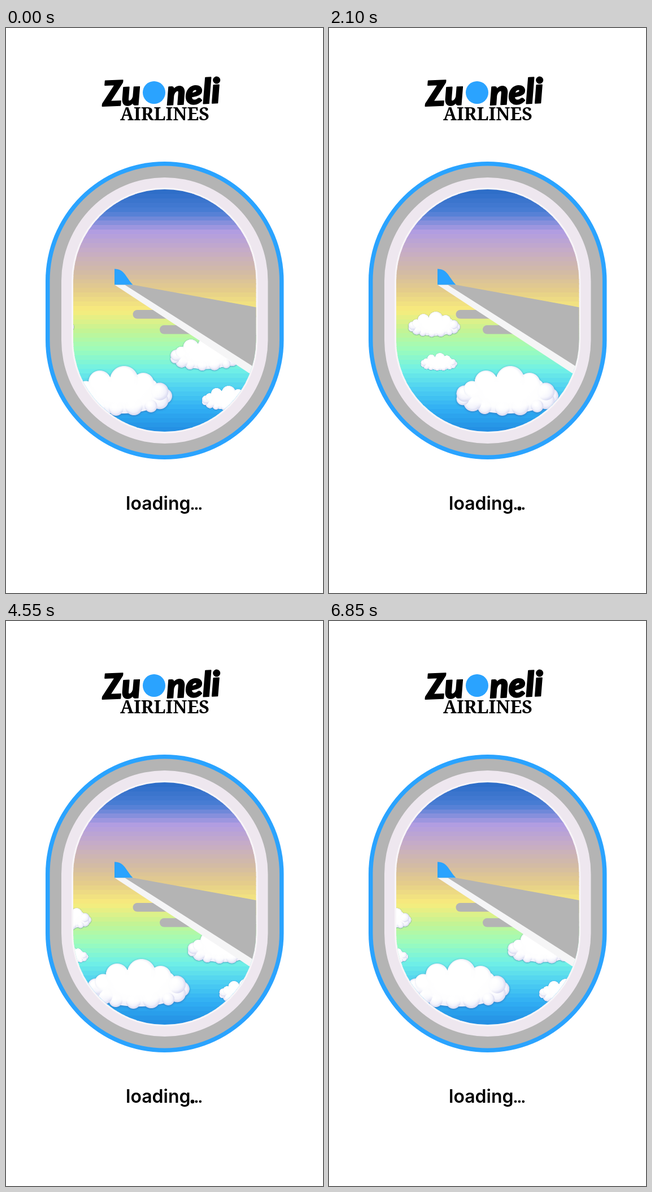
These frames come from a looping animation (561 by 998 pixels, 6.9 s). An HTML page with a canvas:

```html
<!DOCTYPE html>
<html lang="en">
<head>
<meta charset="utf-8">
<title>Loading</title>
<style>
  html, body { margin: 0; width: 100%; height: 100%; overflow: hidden; background: #fff; }
  canvas { display: block; width: 561px; height: 998px; }
</style>
</head>
<body>
<canvas id="stage" width="561" height="998"></canvas>
<script>
const ctx = document.getElementById('stage').getContext('2d');
const LOOP = 6900, STEP = 50, STEPS = LOOP / STEP, TAU = Math.PI * 2;
const BLUE = '#2aa3ff', GRAY = '#b4b4b4';

// evenly spaced from top to bottom
const SKY = ['2e6ec8', '4a7dd4', 'b09ce2', 'c6acc6', 'd2baa6', 'e4cc8a', 'f8ec7c',
  'c4f494', '9cfcbc', '70f0e6', '4ccef2', '30aef3', '2490e4'];

// three tiles of clouds make one strip; only the smallest cloud differs
const STRIP = 1174;
const TILES = [
  { start: 112, dx: -62, y: 574 },
  { start: 490, dx: 41, y: 556 },
  { start: 878, dx: -46, y: 566 }
];

function circle(c, x, y, r) {
  c.beginPath();
  c.arc(x, y, r, 0, TAU);
  c.fill();
}

// a ring of small puffs plus three large ones on top, in a 182 x 89 box
function cloudPuffs() {
  const puffs = [];
  for (let i = 0; i < 15; i++) {
    const a = i / 15 * TAU, r = 13.5 + 2.5 * Math.sin(i * 2.4);
    puffs.push([91 + (91 - r) * Math.cos(a), 53 + (35 - r) * Math.sin(a), r]);
  }
  return [...puffs, [54, 28, 20], [131, 31, 19], [97, 25, 25]];
}

function makeCloud() {
  const pad = 10, k = 2;
  const cv = document.createElement('canvas');
  cv.width = (182 + pad * 2) * k;
  cv.height = (89 + pad * 2) * k;
  const c = cv.getContext('2d');
  c.scale(k, k);
  c.translate(pad, pad);

  const puffs = cloudPuffs(), shape = new Path2D();
  for (const [x, y, r] of puffs) {
    shape.moveTo(x + r, y);
    shape.arc(x, y, r, 0, TAU);
  }
  shape.moveTo(171, 52);
  shape.ellipse(91, 52, 80, 32, 0, 0, TAU);

  c.save();
  c.shadowColor = 'rgba(50,90,165,.6)';
  c.shadowBlur = 7;
  c.shadowOffsetY = 2;
  c.fillStyle = '#f1f1fb';
  c.fill(shape);
  c.restore();

  c.clip(shape);
  for (const [x, y, r] of puffs) {
    const g = c.createRadialGradient(x - r * .25, y - r * .35, r * .3, x, y, r);
    g.addColorStop(0, '#fff');
    g.addColorStop(.65, y > 45 ? '#f3f3fc' : '#fff');
    g.addColorStop(1, y > 45 ? '#d8d9f0' : '#eaedf7');
    c.fillStyle = g;
    circle(c, x, y, r);
  }

  // soft white middle
  c.translate(90, 46);
  c.scale(1, .45);
  const mid = c.createRadialGradient(0, 0, 40, 0, 0, 78);
  mid.addColorStop(0, '#fff');
  mid.addColorStop(.6, 'rgba(255,255,255,.9)');
  mid.addColorStop(1, 'rgba(255,255,255,0)');
  c.fillStyle = mid;
  circle(c, 0, 0, 78);
  return { cv, pad, k };
}

const cloud = makeCloud();

function drawCloud(x, y, s) {
  const { cv, pad, k } = cloud;
  ctx.drawImage(cv, x - pad * s, y - pad * s, cv.width / k * s, cv.height / k * s);
}

function stadium(x, y, w, h) {
  ctx.beginPath();
  ctx.roundRect(x, y, w, h, Math.min(w, h) / 2);
}

function pane(inset) {
  stadium(70 + inset, 236 + inset, 421.5 - inset * 2, 526 - inset * 2);
}

function polygon(color, ...pts) {
  ctx.fillStyle = color;
  ctx.beginPath();
  pts.forEach(([x, y]) => ctx.lineTo(x, y));
  ctx.fill();
}

function skyColor(f) {
  const p = f * (SKY.length - 1), i = Math.min(SKY.length - 2, Math.floor(p));
  const part = (hex, j) => parseInt(hex.slice(j, j + 2), 16);
  const mix = j => Math.round(part(SKY[i], j) + (part(SKY[i + 1], j) - part(SKY[i], j)) * (p - i));
  return `rgb(${[0, 2, 4].map(mix)})`;
}

function drawSky() {
  const top = 285, bands = 54, h = 428 / bands;
  for (let i = 0; i < bands; i++) {
    ctx.fillStyle = skyColor(i / (bands - 1));
    ctx.fillRect(115, Math.round(top + i * h), 332, Math.ceil(h) + 1);
  }
}

function travel(n) {
  // steady speed with a slightly quicker stretch
  const speed = 25.29;
  const boost = Math.min(1, Math.max(0, (n - 76) / 30));
  return n * speed + boost * (3 * STRIP - STEPS * speed);
}

function drawClouds(n) {
  const shift = travel(n) % STRIP;
  for (const { start, dx, y } of TILES) {
    for (const wrap of [-STRIP, 0, STRIP]) {
      const x = start - shift + wrap;
      drawCloud(x - 84, 501, .507);
      drawCloud(x + dx, y, .357);
      drawCloud(x + 178, 544.5, .69);
      drawCloud(x + 234, 632, .495);
      drawCloud(x, 597, 1);
    }
  }
}

function drawWing() {
  ctx.fillStyle = GRAY;
  stadium(224.5, 498, 120, 15.5);
  ctx.fill();
  stadium(272, 525, 120, 15.5);
  ctx.fill();
  polygon('#f5f5f6', [192, 453.5], [224, 453.5], [450, 600], [450, 622.5]);
  polygon(GRAY, [210, 453.5], [224, 453.5], [450, 494.5], [450, 606]);
  ctx.fillStyle = BLUE;
  ctx.beginPath();
  ctx.moveTo(192, 425.5);
  ctx.bezierCurveTo(210, 426, 211, 439, 224.5, 453.5);
  ctx.lineTo(192, 453.5);
  ctx.fill();
}

function drawWindow(n) {
  [BLUE, GRAY, '#eee7ef', '#f8f5f8'].forEach((color, i) => {
    ctx.fillStyle = color;
    pane([0, 7.5, 28, 46][i]);
    ctx.fill();
  });
  ctx.save();
  pane(49);
  ctx.clip();
  drawSky();
  drawClouds(n);
  drawWing();
  ctx.restore();
}

function tilted(text, x, y) {
  ctx.save();
  ctx.translate(x, y);
  ctx.rotate(-.04);
  ctx.fillText(text, 0, 0);
  ctx.strokeText(text, 0, 0);
  ctx.restore();
}

function drawLogo() {
  ctx.fillStyle = BLUE;
  circle(ctx, 262, 114, 20);
  ctx.fillStyle = ctx.strokeStyle = '#000';
  ctx.lineWidth = 2;
  ctx.lineJoin = 'round';
  ctx.font = 'italic 900 61px Lato, sans-serif';
  tilted('Zu', 172, 138);
  tilted('neli', 285, 136);
  ctx.font = '600 32px "Noto Serif", serif';
  ctx.textAlign = 'center';
  ctx.fillText('AIRLINES', 281, 163);
  ctx.textAlign = 'left';
}

function drawLoading(n) {
  ctx.fillStyle = '#000';
  ctx.font = '600 32px Inter, sans-serif';
  ctx.fillText('loading', 212, 851);
  // the dots swell one after another, then rest
  const period = STEPS / 5, phase = n % period;
  for (let i = 0; i < 3; i++) {
    const d = Math.abs(phase / period * 4 - i - 1);
    const swell = d < 1 ? (1 + Math.cos(d * Math.PI)) / 2 : 0;
    circle(ctx, 330 + i * 6.9, 848.8, 2.3 + 1.2 * swell);
  }
}

function draw(ms) {
  const n = Math.floor(ms % LOOP / STEP);
  ctx.fillStyle = '#fff';
  ctx.fillRect(0, 0, 561, 998);
  drawLogo();
  drawWindow(n);
  drawLoading(n);
}

const begin = performance.now();

function tick() {
  draw(performance.now() - begin);
  requestAnimationFrame(tick);
}

tick();
</script>
</body>
</html>
```
